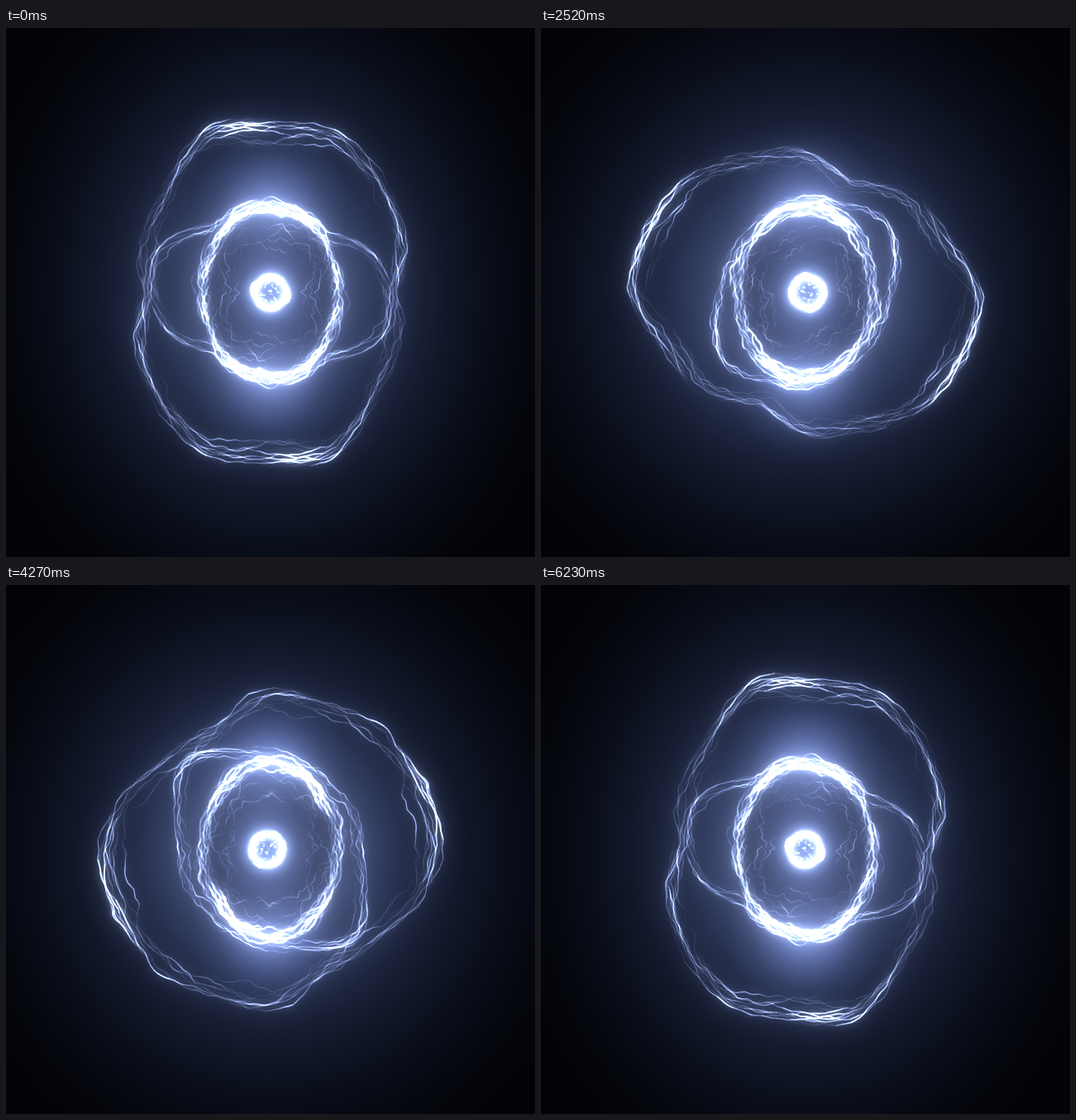
These frames come from a looping animation (640 px wide and 640 px high, 6.37 s). An HTML page with a canvas:

```html
<!DOCTYPE html>
<html lang="en">
<head>
<meta charset="utf-8">
<title>Nebula</title>
<style>
  html, body { margin: 0; width: 100%; height: 100%; overflow: hidden; background: #020306; }
  canvas { display: block; width: 100vw; height: 100vh; }
</style>
</head>
<body>
<canvas id="stage" width="640" height="640"></canvas>
<script>
const SIZE = 640, MID = 320, LOOP = 6370, STEP = 70, TAU = Math.PI * 2;
const ctx = document.getElementById('stage').getContext('2d');
const layer = document.createElement('canvas');
layer.width = layer.height = SIZE;
const ink = layer.getContext('2d');

// Radii every 22.5 degrees over half a turn; the shells are point-symmetric.
const poses = [
  { at: 0,    shell: [152, 165, 180, 206, 200, 209, 188, 170], band: [148, 147, 114, 107, 106, 105, 100, 130] },
  { at: 1400, shell: [190, 200, 200, 208, 188, 190, 165, 175], band: [120, 110, 105, 108, 115, 165, 138, 132] },
  { at: 2520, shell: [208, 203, 197, 176, 168, 146, 172, 178], band: [106, 102, 103, 108, 117, 118, 130, 118] },
  { at: 3150, shell: [200, 197, 190, 166, 148, 160, 172, 194], band: [117, 110, 112, 122, 138, 136, 125, 124] },
  { at: 4270, shell: [200, 186, 163, 160, 187, 188, 197, 196], band: [111, 122, 148, 130, 120, 113, 108, 114] },
  { at: 5040, shell: [198, 170, 152, 178, 203, 207, 204, 192], band: [120, 142, 124, 110, 108, 110, 108, 118] }
];

function random(seed) {
  let s = seed * 7919 + 17;
  return () => {
    s = (s + 0x6D2B79F5) | 0;
    let v = Math.imul(s ^ (s >>> 15), 1 | s);
    v ^= v + Math.imul(v ^ (v >>> 7), 61 | v);
    return ((v ^ (v >>> 14)) >>> 0) / 4294967296;
  };
}

// Even harmonics keep the noise equal on opposite sides.
function makeNoise(seed) {
  const rnd = random(seed);
  const waves = [1, 2, 3, 5, 8, 12, 17, 24, 33].map(k => ({
    k: 2 * (k + Math.floor(rnd() * 2)), phase: rnd() * TAU,
    drift: Math.round(rnd() * 4 - 2), amp: Math.pow(k, -0.65) * (0.5 + rnd())
  }));
  return (angle, turn) => waves.reduce((sum, w) =>
    sum + w.amp * Math.sin(w.k * angle + w.phase + w.drift * turn), 0);
}

function makeStrands(count, seed) {
  return Array.from({ length: count }, (_, i) => ({
    wave: makeNoise(seed + i * 2), light: makeNoise(seed + i * 2 + 1), depth: i / count
  }));
}

const shellStrands = makeStrands(12, 10);
const bandStrands = makeStrands(8, 60);
const ringStrands = makeStrands(14, 110);
const wispStrands = makeStrands(7, 210);
const coreStrands = makeStrands(5, 160);
const specks = (() => {
  const rnd = random(9);
  return Array.from({ length: 55 }, () => ({
    angle: rnd() * TAU, r: 17 * Math.sqrt(rnd()), bright: rnd()
  }));
})();

function spline(a, b, c, d, u) {
  return b + 0.5 * u * (c - a + u * (2 * a - 5 * b + 4 * c - d + u * (3 * (b - c) + d - a)));
}

// The samples cover half a turn and repeat.
function radiusAt(radii, angle) {
  const n = radii.length, x = angle / Math.PI * n, i = Math.floor(x);
  const r = j => radii[((i + j) % n + n) % n];
  return spline(r(-1), r(0), r(1), r(2), x - i);
}

const spinAt = time => time / LOOP * Math.PI;

// Blends neighbouring poses in the frame that turns with the shells.
function poseAt(time, key, samples = 24) {
  const n = poses.length;
  let i = n - 1;
  while (poses[i].at > time) i--;
  const when = j => poses[(j + n) % n].at + Math.floor(j / n) * LOOP;
  const span = when(i + 1) - when(i), u = (time - when(i)) / span;
  const before = span / (when(i + 1) - when(i - 1));
  const after = span / (when(i + 2) - when(i));
  return Array.from({ length: samples }, (_, s) => {
    const local = s / samples * Math.PI;
    const [a, b, c, d] = [-1, 0, 1, 2].map(j =>
      radiusAt(poses[(i + j + n) % n][key], local - spinAt(when(i + j))));
    const m0 = (c - a) * before, m1 = (d - b) * after;
    return b + u * (m0 + u * (3 * (c - b) - 2 * m0 - m1 + u * (2 * (b - c) + m0 + m1)));
  });
}

function drawStrand(strand, turn, radius, light, wobble, width, cx = MID, parts = 220) {
  const spin = turn / 2;
  let px, py;
  for (let i = 0; i <= parts; i++) {
    const angle = i / parts * TAU, local = angle + spin;
    const r = radius(angle, local) + wobble * strand.wave(local, turn);
    const x = cx + r * Math.cos(angle), y = MID + r * Math.sin(angle);
    if (i) {
      const glow = Math.pow(Math.max(0, 0.5 + 0.3 * strand.light(local, turn)), 2);
      const alpha = Math.min(1, glow * light(angle));
      if (alpha > 0.008) {
        ink.strokeStyle = `rgba(172,190,245,${alpha.toFixed(3)})`;
        ink.lineWidth = width * (0.8 + 0.6 * alpha);
        ink.beginPath();
        ink.moveTo(px, py);
        ink.lineTo(x, y);
        ink.stroke();
      }
    }
    px = x;
    py = y;
  }
}

function radial(x, y, r, stops) {
  const g = ctx.createRadialGradient(x, y, 0, x, y, r);
  for (const [at, color] of stops) g.addColorStop(at / r, color);
  return g;
}

function drawHaze(turn) {
  const wide = 0.5 - 0.5 * Math.cos(turn);
  ctx.fillStyle = '#020306';
  ctx.fillRect(0, 0, SIZE, SIZE);
  ctx.save();
  ctx.translate(MID, MID);
  ctx.scale(0.92 + 0.12 * wide, 1.1 - 0.06 * wide);
  ctx.fillStyle = radial(0, 0, 400, [
    [0, '#4c587c'], [45, '#424d70'], [75, '#3e496c'], [100, '#414d73'],
    [125, '#343f62'], [160, '#252e4b'], [195, '#1a2138'], [235, '#111728'],
    [285, '#0a0e1a'], [340, '#05070e'], [400, '#020306']
  ]);
  ctx.fillRect(-500, -500, 1000, 1000);
  ctx.restore();
  ctx.globalCompositeOperation = 'lighter';
  for (const y of [MID - 106, MID + 106]) {
    ctx.fillStyle = radial(MID, y, 95, [
      [0, 'rgba(100,116,165,.6)'], [35, 'rgba(85,100,148,.36)'],
      [65, 'rgba(70,85,130,.12)'], [95, 'rgba(60,75,120,0)']
    ]);
    ctx.fillRect(MID - 95, y - 95, 190, 190);
  }
}

function drawCore(x, turn) {
  ctx.fillStyle = radial(x, MID, 62, [
    [0, 'rgba(120,142,200,.45)'], [9, 'rgba(135,158,215,.5)'], [15, 'rgba(200,215,250,.65)'],
    [21, 'rgba(205,220,252,.7)'], [26, 'rgba(130,152,212,.4)'],
    [38, 'rgba(85,102,160,.2)'], [62, 'rgba(60,78,130,0)']
  ]);
  ctx.fillRect(x - 62, MID - 62, 124, 124);
  for (const s of specks) {
    const a = s.angle + turn, size = 1 + s.bright * 2;
    ctx.fillStyle = `rgba(170,190,245,${0.15 + 0.4 * s.bright})`;
    ctx.fillRect(x + s.r * Math.cos(a), MID + s.r * Math.sin(a), size, size);
  }
}

function draw(time) {
  const turn = time / LOOP * TAU;
  const shell = poseAt(time, 'shell'), band = poseAt(time, 'band');
  const hot = 95 / 360 * TAU - spinAt(time);
  const coreX = MID + 4.5 * Math.sin(turn);
  const hotLight = angle => 0.5 + 0.9 * Math.pow(Math.cos(angle - hot), 8);
  const ringRadius = angle => 1 / Math.hypot(Math.cos(angle) / 86, Math.sin(angle) / 109);

  ink.clearRect(0, 0, SIZE, SIZE);
  ink.globalCompositeOperation = 'lighter';
  ink.lineCap = 'butt';
  for (const s of shellStrands) {
    const scale = 1.01 - 0.11 * s.depth * s.depth;
    drawStrand(s, turn, (_, local) => scale * radiusAt(shell, local),
      a => hotLight(a) * (1 - 0.65 * s.depth), 3.2 + 2.6 * s.depth, 1.3);
  }
  for (const s of bandStrands) {
    const scale = 1.01 - 0.08 * s.depth;
    drawStrand(s, turn, (_, local) => scale * radiusAt(band, local),
      () => 0.75 - 0.5 * s.depth, 2.6 + 2 * s.depth, 1.3);
  }
  for (const s of ringStrands) {
    const scale = 1.01 - 0.12 * s.depth;
    drawStrand(s, turn, a => scale * ringRadius(a),
      a => 0.45 + 1.05 * Math.sin(a) ** 4, 3, 1.8);
  }
  for (const s of wispStrands) {
    const scale = 0.92 - 0.42 * s.depth;
    drawStrand(s, turn, a => scale * ringRadius(a), () => 0.24, 5, 1.2);
  }
  for (const s of coreStrands)
    drawStrand(s, turn, () => 22 - 6 * s.depth, () => 1.1, 0.8, 2.4, coreX, 80);

  drawHaze(turn);
  for (const [blur, alpha] of [[14, 0.42], [4, 0.5], [0, 1]]) {
    ctx.filter = blur ? `blur(${blur}px)` : 'none';
    ctx.globalAlpha = alpha;
    ctx.drawImage(layer, 0, 0);
  }
  drawCore(coreX, turn);
  ctx.globalCompositeOperation = 'source-over';
}

// Two steps of the loop hold the picture before them.
function heldTime(now) {
  const time = Math.floor(now % LOOP / STEP) * STEP;
  return time === 420 || time === 6300 ? time - STEP : time;
}

let shown = -1;
const start = performance.now();
function tick() {
  const time = heldTime(performance.now() - start);
  if (time !== shown) draw(shown = time);
  requestAnimationFrame(tick);
}
tick();
</script>
</body>
</html>
```
